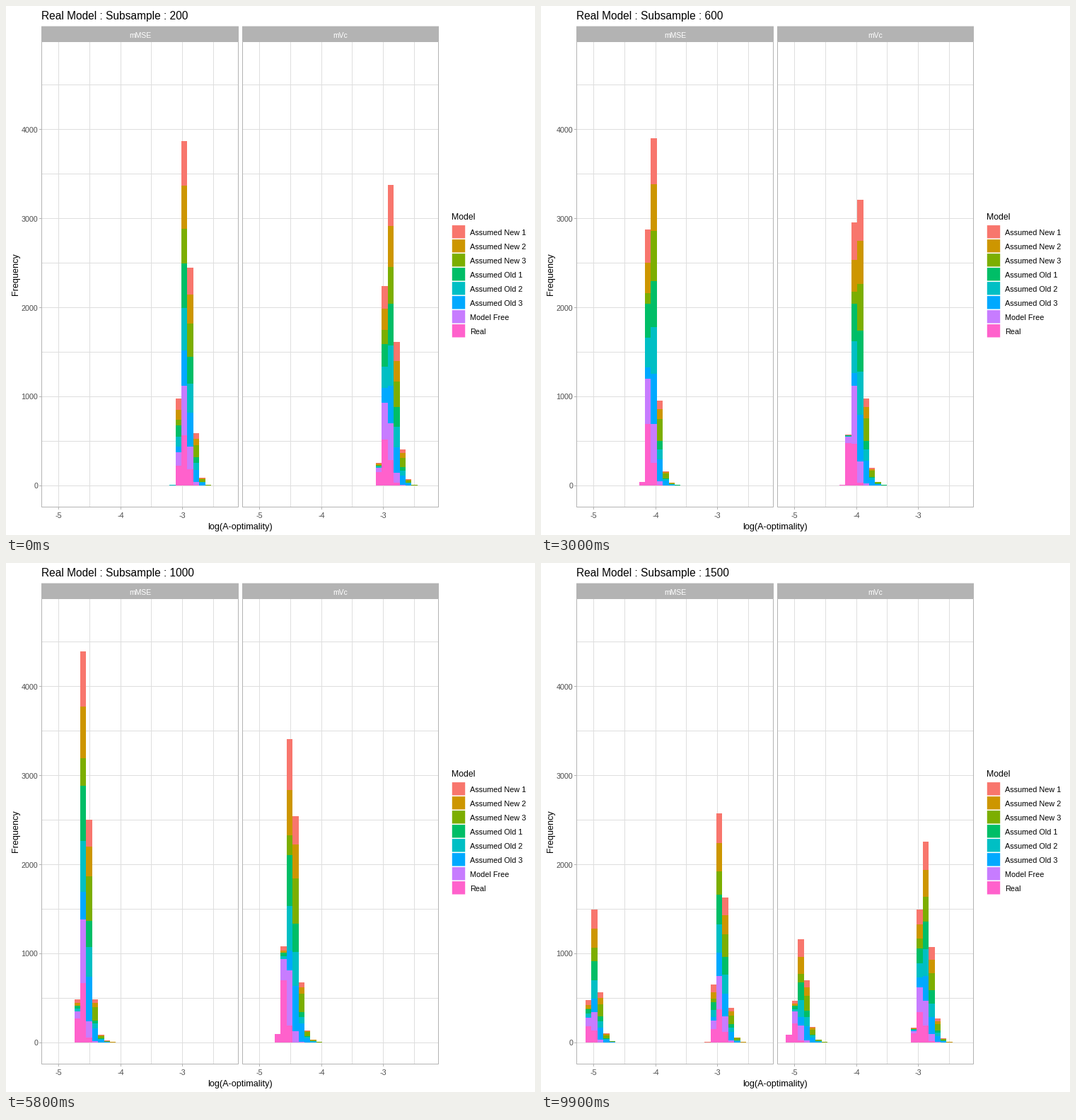
Write a matplotlib script that moves like this. It is 748 by 748 pixels and loops after 10000 ms.

```python
import math

import numpy as np
import matplotlib.pyplot as plt
from matplotlib.animation import FuncAnimation
from matplotlib.collections import PolyCollection
from matplotlib.patches import Rectangle

plt.rcParams["font.family"] = "Liberation Sans"

SIDE, DPI = 748, 100
PX = 72 / DPI  # points per pixel
BINS, BIN_W = 30, 8.406
BASE, PER_COUNT = 678.4, 0.126
SIZES = range(200, 1501, 100)

MODELS = ["Assumed New 1", "Assumed New 2", "Assumed New 3", "Assumed Old 1",
          "Assumed Old 2", "Assumed Old 3", "Model Free", "Real"]
COLORS = ["#F8766D", "#CD9600", "#7CAE00", "#00BE67",
          "#00BFC4", "#00A9FF", "#C77CFF", "#FF61CC"]

# Old and new assumed models share a shape: 1, 2, 3, free, real
SHAPE_OF = [0, 1, 2, 0, 1, 2, 3, 4]
SPREAD = [0.53, 0.56, 0.64, 0.46, 0.43]
SKEW = [0.28, 0.28, 0.35, 0.25, 0.10]

# first, last: median bin of each shape at the smallest and largest size
PANELS = [
    dict(name="mMSE", left=50.5, right=328.5, tick=74.5, bin0=62.98, scale=1,
         first=[22.75, 22.82, 23.10, 22.62, 22.45],
         last=[1.47, 1.53, 2.03, 1.24, 0.92]),
    dict(name="mVc", left=334.5, right=611.5, tick=358.5, bin0=346.4, scale=1.1,
         first=[23.48, 23.53, 23.79, 23.08, 22.67],
         last=[2.59, 2.74, 3.35, 2.09, 1.27]),
]

norm_cdf = np.vectorize(lambda z: 0.5 * (1 + math.erf(z / math.sqrt(2))))


def bin_counts(panel, size, shape):
    """Expected counts of 1000 right-skewed values in each bin."""
    step = math.log(size / SIZES[0])
    early = math.exp(-2.5 * step)  # small samples: wider, no long tail
    way = step / math.log(SIZES[-1] / SIZES[0])
    mid = (1 - way) * panel["first"][shape] + way * panel["last"][shape]
    spread = panel["scale"] * (SPREAD[shape] + 0.2 * early)
    skew = SKEW[shape] * (1 - 0.35 * early)

    off = np.arange(BINS + 1) - mid
    core = norm_cdf(np.log(np.maximum(1 + skew * off / spread, 1e-6)) / skew)
    tail = 1 - np.exp(-np.maximum(off, 0) / 1.5)
    weight = 0.12 * SKEW[shape] * (1 - early)
    share = (1 - weight) * core + weight * tail
    share[0], share[-1] = 0, 1
    return np.diff(np.round(1000 * share))


# counts[state, panel, model, bin]
counts = np.array([[[bin_counts(p, n, s) for s in SHAPE_OF] for p in PANELS]
                   for n in SIZES])

STARTS = [4 + 7 * i + min(i, 3) for i in range(len(SIZES))]


def state_at(frame):
    """Current state and how far it has moved to the next one."""
    if frame < STARTS[0]:
        return 0, 0.0
    i = sum(start <= frame for start in STARTS) - 1
    part = (frame - STARTS[i] + 1) / (4 if i < 3 else 3)
    return (i, part) if part < 1 else ((i + 1) % len(SIZES), 0.0)


fig = plt.figure(figsize=(SIDE / DPI, SIDE / DPI), dpi=DPI, facecolor="white")
ax = fig.add_axes([0, 0, 1, 1])
ax.set_xlim(0, SIDE)
ax.set_ylim(SIDE, 0)
ax.axis("off")


def label(x, y, text, px, color="black", **kw):
    return ax.text(x, y, text, fontsize=px * PX, color=color, va="baseline", **kw)


def line(x0, y0, x1, y1, color):
    ax.plot([x0, x1], [y0, y1], color=color, lw=PX, zorder=1,
            solid_capstyle="butt", snap=False)


def box(x, y, w, h, color):
    ax.add_patch(Rectangle((x, y), w, h, fc=color, lw=0, zorder=1, snap=False))


GRID, EDGE, TICK = "#DEDEDE", "#B3B3B3", "#4D4D4D"
TOP, BOTTOM, UNIT = 50.5, 708.5, 87.5

for p in PANELS:
    left, right = p["left"], p["right"]
    for half in range(6):
        x = math.floor(p["tick"] + half * UNIT / 2) + 0.5
        line(x, TOP, x, BOTTOM, GRID)
        if half in (0, 2, 4):
            line(x, 709, x, 712, EDGE)
            label(x - 0.5, 724, str(half // 2 - 5), 10.8, TICK, ha="center")
    for half in range(10):
        y = 678.5 - 63 * half
        line(left, y, right, y, GRID)
    box(left - 0.5, 28.6, right - left + 1, 21.4, EDGE)
    label((left + right) / 2, 44.5, p["name"], 10.4, "white", ha="center")
    ax.add_patch(Rectangle((left, TOP), right - left, BOTTOM - TOP, fill=False,
                           ec=EDGE, lw=PX, zorder=4, snap=False))

for k in range(5):
    y = 678.5 - 126 * k
    line(47, y, 50, y, EDGE)
    label(45.3, y + 4, str(1000 * k), 10.8, TICK, ha="right")

title = label(50, 19, "", 15.55)
label(331, 740, "log(A-optimality)", 12.6, ha="center")
label(17, 379, "Frequency", 12.6, rotation=90, rotation_mode="anchor",
      ha="center")
label(630, 302, "Model", 12.3)
for row, (name, color) in enumerate(zip(MODELS, COLORS)):
    y = 319.3 + 20 * row
    box(630.8, y - 9.2, 18.4, 18.4, color)
    label(656, y + 4.7, name, 10.85)

bars = PolyCollection([], linewidths=0, antialiaseds=False, zorder=3)
ax.add_collection(bars, autolim=False)


def update(frame):
    i, part = state_at(frame)
    now = (1 - part) * counts[i] + part * counts[(i + 1) % len(SIZES)]
    verts, fills = [], []
    for p, table in zip(PANELS, now):
        xs = np.round(p["bin0"] + BIN_W * np.arange(BINS + 1))
        level = np.zeros(BINS)
        for m in reversed(range(len(MODELS))):
            low = np.round(BASE - PER_COUNT * level)
            level = level + table[m]
            high = np.round(BASE - PER_COUNT * level)
            for b in np.flatnonzero(high < low):
                x0, x1 = xs[b], xs[b + 1]
                verts.append([(x0, low[b]), (x1, low[b]),
                              (x1, high[b]), (x0, high[b])])
                fills.append(COLORS[m])
    bars.set_verts(verts)
    bars.set_facecolor(fills)
    title.set_text(f"Real Model : Subsample : {SIZES[i]}")
    return bars, title


anim = FuncAnimation(fig, update, frames=100, interval=100, repeat=True,
                     repeat_delay=0, init_func=lambda: update(0))
plt.show()
```
